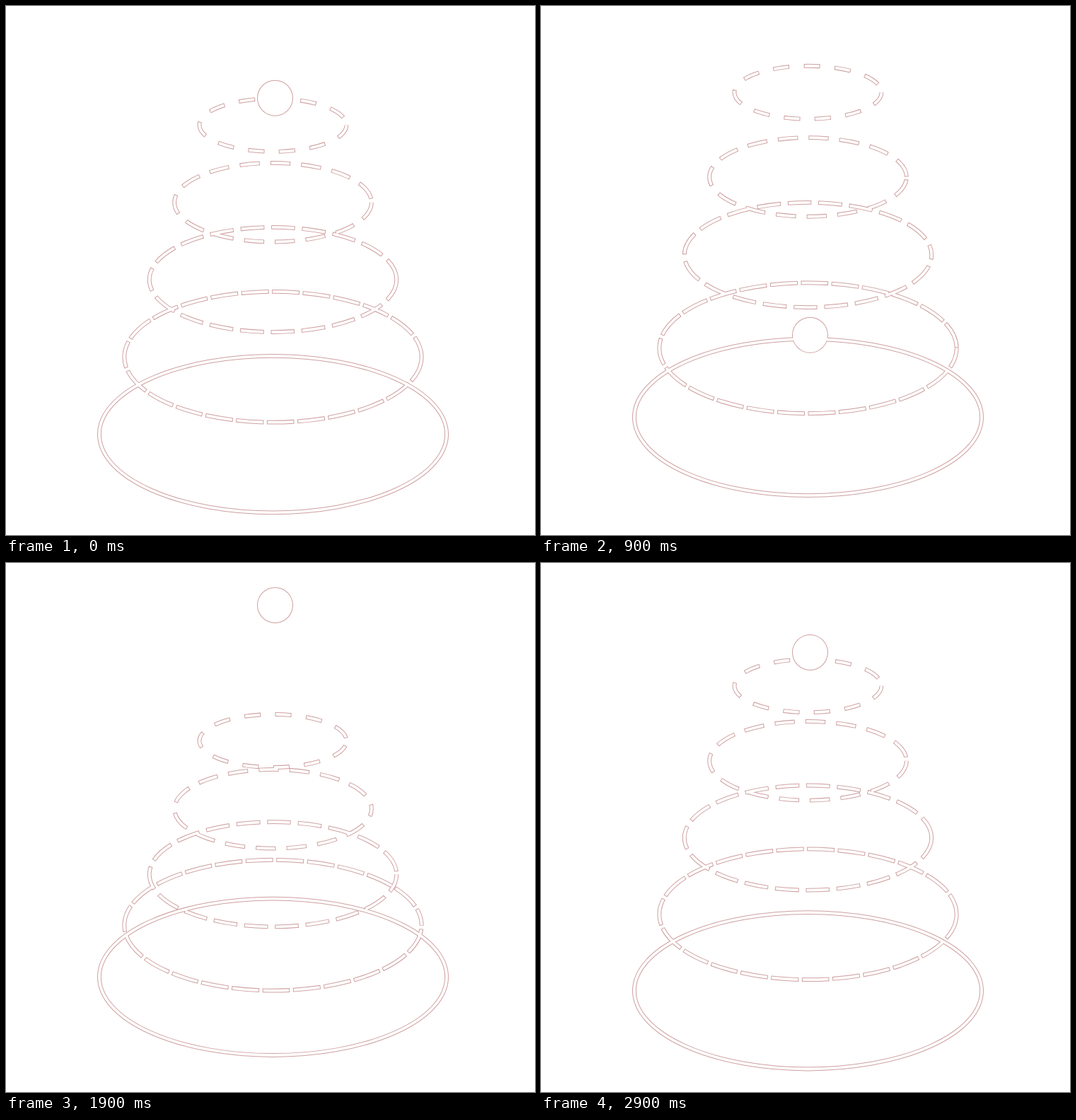
An HTML page that plays this animation: 748x748 px, repeating every 2.93 s.

```html
<!DOCTYPE html>
<html lang="en">
<head>
<meta charset="utf-8">
<title>Ball and rings</title>
<style>
  html, body { margin: 0; width: 100%; height: 100%; overflow: hidden; background: #fff; }
  svg { display: block; width: 100%; height: 100%; }
</style>
</head>
<body>
<svg id="stage" viewBox="0 0 748 748"></svg>
<script>
const LOOP = 2930;
const TURNAROUND = 570;
const PERIOD = 43.5;
const EDGE = 1;
const LINE = 5.8;

// From top to bottom. Each ring settles up to `high`, drops to `low`, then drifts back home.
const rings = [
  { high: 121.8, settle: 1000, drop: [1480, 1950], low: 255, drift: 2.1, laps: 1 },
  { high: 241.8, settle: 960, drop: [1415, 1780], low: 356, drift: 1, laps: 2 },
  { high: 352, settle: 750, drop: [975, 1490], low: 461.5, drift: 1, laps: 2 },
  { high: 460, settle: 700, drop: [700, 1190], low: 526, drift: 0.85, laps: 2 },
  { high: 581.5, settle: 500, drop: [500, 800], low: 581.5, drift: 2.8, laps: 0 }
].map((ring, i) => ({
  ...ring,
  home: 168.5 + 109.3 * i,
  rx: 104 + 35.4 * i,
  ry: 37.5 + 18.3 * i,
  dash: 23 + 5.3 * i,
  phase: 97.35 + 46.2 * i,
  swing: 2.5 * (i + 1) ** 2,
  snap: 4.9 * (i + 1) ** -0.45
}));

const sine = u => (1 - Math.cos(Math.PI * u)) / 2;
const power = p => u => u ** p;
const easeOut = u => 1 - (1 - u) ** 2;

function move(time, t0, t1, from, to, ease) {
  const u = Math.min(1, Math.max(0, (time - t0) / (t1 - t0)));
  return from + (to - from) * ease(u);
}

function ringY(time, { home, high, settle, drop: [start, end], low, drift }) {
  if (time < start) return move(time, 0, settle, home, high, easeOut);
  if (time < end) return move(time, start, end, high, low, sine);
  return move(time, end, LOOP, low, home, power(drift));
}

function ballY(time) {
  const [top, gate, bottom] = [42, 130, 575];
  const [impact, apex] = [1150, 2000];
  if (time < impact) return move(time, 0, impact, gate, bottom, power(1.16));
  if (time < apex) return move(time, impact, apex, bottom, top, sine);
  return move(time, apex, LOOP, top, gate, power(1.3));
}

// Dashes swing back a little, then run forward by whole dash periods.
function ringTurn(time, { swing, snap, laps }) {
  if (time < TURNAROUND) return move(time, 0, TURNAROUND, 0, -swing, sine);
  return move(time, TURNAROUND, LOOP, -swing, laps * PERIOD, u => 1 - (1 - u ** 2.1) ** snap);
}

const stage = document.getElementById("stage");

function add(parent, name, attrs) {
  const node = document.createElementNS("http://www.w3.org/2000/svg", name);
  for (const k in attrs) node.setAttribute(k, attrs[k]);
  return parent.appendChild(node);
}

// The white layer covers all but the rim of the tinted layer, outlining the union.
const layers = [["#cfa0a0", 0], ["#fff", EDGE]].map(([color, inset]) => {
  const group = add(stage, "g", { fill: "none", stroke: color, "stroke-width": LINE - 2 * inset });
  const ellipses = rings.map(({ rx, ry, dash, laps }) => {
    const node = add(group, "ellipse", { cx: 377.5, rx, ry });
    const length = dash - 2 * inset;
    if (laps) node.setAttribute("stroke-dasharray", `${length} ${PERIOD - length}`);
    return node;
  });
  const ball = add(group, "circle", { cx: 380.5, r: 25.5 - inset, fill: color, stroke: "none" });
  return { inset, ellipses, ball };
});

function draw(time) {
  for (const { inset, ellipses, ball } of layers) {
    ball.setAttribute("cy", ballY(time));
    rings.forEach((ring, i) => {
      const start = ring.phase - ringTurn(time, ring) - ring.dash / 2 + inset;
      ellipses[i].setAttribute("cy", ringY(time, ring));
      ellipses[i].setAttribute("stroke-dashoffset", -start);
    });
  }
}

function tick() {
  draw(performance.now() % LOOP);
  requestAnimationFrame(tick);
}
tick();
</script>
</body>
</html>
```
